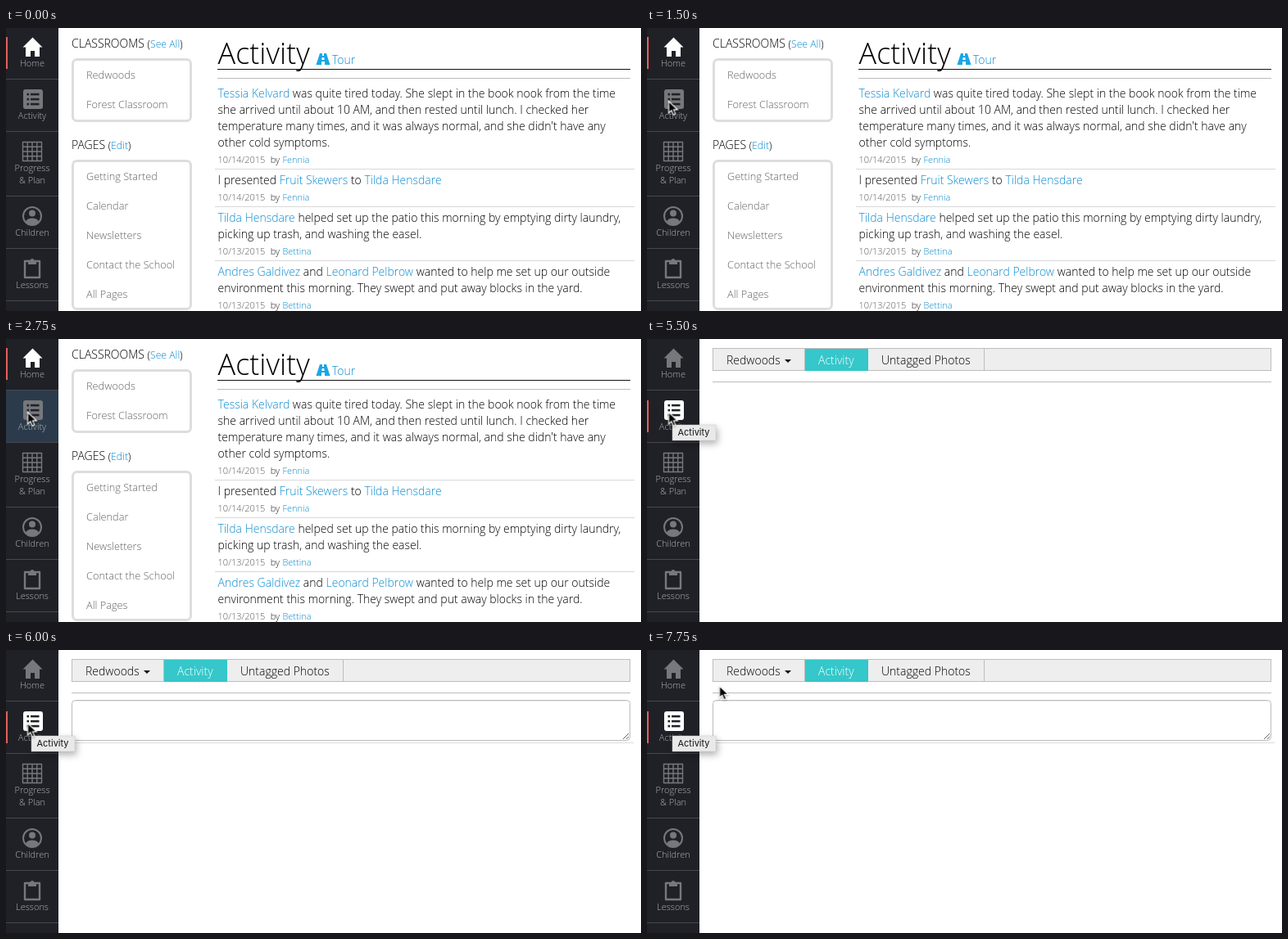
These frames come from a looping animation (775x346 px, 8 s). An HTML page:

```html
<!DOCTYPE html>
<html lang="en">
<head>
<meta charset="utf-8">
<title>Classroom activity</title>
<style>
  html, body { margin: 0; width: 100%; height: 100%; overflow: hidden; background: #fff; }
  svg { display: block; width: 775px; height: 346px; }
  text { font-family: "Open Sans", sans-serif; font-weight: 300; }
  .tip { font-family: Inter, sans-serif; font-weight: 400; }
</style>
</head>
<body>
<svg id="stage" viewBox="0 0 775 346" xmlns="http://www.w3.org/2000/svg"></svg>
<script>
const LOOP = 8000;
const DARK = '#202127', GRAY = '#77787c', LABEL = '#b2b3b7', INK = '#000', BLUE = '#0a8bd0';
const BODY_X = 258.6;

const text = (x, y, content, size = 14, fill = INK, extra = '') =>
  `<text x="${x}" y="${y}" font-size="${size}" fill="${fill}" ${extra}>${content}</text>`;
const rect = (x, y, w, h, fill, extra = '') =>
  `<rect x="${x}" y="${y}" width="${w}" height="${h}" fill="${fill}" ${extra}/>`;
const rule = (x1, x2, y, fill) => rect(x1, y, x2 - x1, 1, fill);
const link = (label, x) => `<tspan fill="${BLUE}"${x ? ` x="${x}"` : ''}>${label}</tspan>`;
const label = (y, content) => text(32, y, content, 11, LABEL, 'text-anchor="middle"');

// Sidebar
const gridLines = [0, 1, 2, 3, 4].map(i => {
  const d = i * 5.75;
  return `M${20.5 + d} 139.5v23M20.5 ${139.5 + d}h23`;
}).join('');

const listRows = [81, 87, 93].map(y =>
  rect(25.5, y - 1.2, 2.6, 2.6, DARK) + rect(30, y - 1.2, 10.5, 2.6, DARK)).join('');

const sidebar = `
  ${rect(0, 0, 64, 346, DARK)}
  ${rect(0, 63, 64, 63, '#2b3b4b', 'id="hover"')}
  ${[62, 126, 205, 269, 333].map(y => rule(0, 64, y, '#47484d')).join('')}
  ${rect(0, 11, 2, 39, '#e0605e', 'id="marker"')}
  <path id="home" fill="currentColor" d="M32.5 11.500L44.500 23.500H41V35h-6v-7h-5v7h-6V23.500H20.500z"/>
  <g id="activity">${rect(21, 75, 24, 24, 'currentColor', 'rx="3"')}${listRows}</g>
  <path d="${gridLines}" stroke="${GRAY}" stroke-width="1.4" stroke-linecap="round" fill="none"/>
  <g fill="${GRAY}">
    <circle cx="32" cy="230" r="11" fill="none" stroke="${GRAY}" stroke-width="2"/>
    <circle cx="32" cy="226.5" r="4"/>
    <path d="M24 236.5q2-4 8-4t8 4q-3 3.8-8 3.8t-8-3.8z"/>
    <path d="M23 285h18v20H23z" fill="none" stroke="${GRAY}" stroke-width="2.4" stroke-linejoin="round"/>
    <path d="M27 284h2.5a2.6 2.6 0 0 1 5 0H37v5H27z"/>
  </g>
  ${label(47, 'Home')}${label(111, 'Activity')}${label(175, 'Progress')}${label(190, '&amp; Plan')}
  ${label(254, 'Children')}${label(318, 'Lessons')}`;

// Home page
const heading = (y, title, action) =>
  text(80, y, `${title} <tspan font-size="12.25">(${link(action)})</tspan>`);
const menu = (y, h, first, items) =>
  rect(81.5, y + 1.5, 144, h - 3, '#fff', 'rx="5" stroke="#ddd" stroke-width="3"') +
  items.map((item, i) => text(98, first + i * 36, item, 12.75, '#636363')).join('');
const post = (y, lines, date, author) =>
  lines.map((line, i) => text(BODY_X, y + i * 20, line)).join('') +
  text(BODY_X, y + lines.length * 20,
    `${date}<tspan x="322.7" fill="#222">by</tspan>${link(author, 337.4)}`, 11, '#5c5c5c');

const homePage = `
  ${heading(24, 'CLASSROOMS', 'See All')}
  ${menu(37, 78, 62, ['Redwoods', 'Forest Classroom'])}
  ${heading(148, 'PAGES', 'Edit')}
  ${menu(161, 184, 186, ['Getting Started', 'Calendar', 'Newsletters', 'Contact the School', 'All Pages'])}
  ${text(BODY_X, 44, 'Activity', 36)}
  <path fill="#1ba6e6" d="M383 31h3v3h2v-3h3l4.5 14H389v-4h-4v4h-6.500zM385.700 36l-.4 3h3.400l-.4-3z" fill-rule="evenodd"/>
  ${text(398, 44, 'Tour', 14, BLUE)}
  ${rule(258, 762, 50, '#111')}${rule(258, 762, 61, '#bbb')}
  ${[172, 218, 284].map(y => rule(255, 767, y, '#d8d8d8')).join('')}
  ${post(85, [
    `${link('Tessia Kelvard')} was quite tired today. She slept in the book nook from the time`,
    'she arrived until about 10 AM, and then rested until lunch. I checked her',
    "temperature many times, and it was always normal, and she didn't have any",
    'other cold symptoms.'], '10/14/2015', 'Fennia')}
  ${post(191, [`I presented ${link('Fruit Skewers')} to ${link('Tilda Hensdare')}`], '10/14/2015', 'Fennia')}
  ${post(237, [
    `${link('Tilda Hensdare')} helped set up the patio this morning by emptying dirty laundry,`,
    'picking up trash, and washing the easel.'], '10/13/2015', 'Bettina')}
  ${post(303, [
    `${link('Andres Galdivez')} and ${link('Leonard Pelbrow')} wanted to help me set up our outside`,
    'environment this morning. They swept and put away blocks in the yard.'], '10/13/2015', 'Bettina')}`;

// Activity page
const activityPage = `
  ${rect(80.5, 11.5, 681, 27, '#eee', 'stroke="#bdbdbd"')}
  ${rect(193, 12, 77, 27, '#35c7ca')}
  ${rect(192, 12, 1, 27, '#bdbdbd')}${rect(411, 12, 1, 27, '#bdbdbd')}
  ${text(97, 31, 'Redwoods')}
  <path d="M168 25h8l-4 4z" fill="#111"/>
  ${text(209, 31, 'Activity', 14, '#fff')}
  ${text(286, 31, 'Untagged Photos')}
  ${rule(80, 762, 52, '#bbb')}
  <g id="editor">
    ${rect(80.5, 61.5, 681, 49, '#fff', 'rx="4" stroke="#bbb"')}
    ${rule(84, 758, 62, '#ececec')}
    <path d="M753 109l7-7M757 109l3-3" stroke="#666" fill="none"/>
    ${rule(76, 766, 113, '#ddd')}
  </g>`;

const overlay = `
  <g id="tooltip">
    ${rect(31, 105, 53, 19, '#e9e9e9', 'stroke="#c8c8c8" stroke-width=".5" style="filter:drop-shadow(2px 4px 4px rgba(0,0,0,.3))"')}
    ${text(37.5, 118, 'Activity', 11, '#111', 'class="tip"')}
  </g>
  <path id="cursor" d="M0 0v14.500l3.300-3.100 2.300 5.400 2.700-1.200-2.300-5.200h4.700z"
    fill="#000" stroke="#fff" stroke-width="1.200" style="filter:drop-shadow(0 1px 1px rgba(0,0,0,.35))"/>`;

const $ = id => document.getElementById(id);
$('stage').innerHTML =
  `<g id="homePage">${homePage}</g><g id="activityPage">${activityPage}</g>${sidebar}${overlay}`;

// Each step is [start in ms, value], held until the next one.
function play(id, property, steps) {
  const frames = steps.map(([time, value]) => ({ offset: time / LOOP, [property]: value, easing: 'step-end' }));
  frames.push({ offset: 1, [property]: steps[steps.length - 1][1] });
  $(id).animate(frames, { duration: LOOP, iterations: Infinity });
}
const at = (x, y) => `translate(${x}px, ${y}px)`;

play('cursor', 'transform', [
  [0, at(71, -40)], [750, at(71, -5)], [1000, at(33, 72)], [1250, at(24.5, 91)],
  [1500, at(26.5, 89.5)], [7500, at(42, 78)], [7750, at(88.5, 44)]
]);
play('hover', 'opacity', [[0, 0], [2750, 1], [5500, 0]]);
play('tooltip', 'opacity', [[0, 0], [4250, 1]]);
play('homePage', 'opacity', [[0, 1], [5500, 0]]);
play('activityPage', 'opacity', [[0, 0], [5500, 1]]);
play('editor', 'opacity', [[0, 0], [6000, 1]]);
play('marker', 'transform', [[0, at(0, 0)], [5500, at(0, 64)]]);
play('home', 'color', [[0, '#fff'], [5500, GRAY]]);
play('activity', 'color', [[0, GRAY], [5500, '#fff']]);
</script>
</body>
</html>
```
